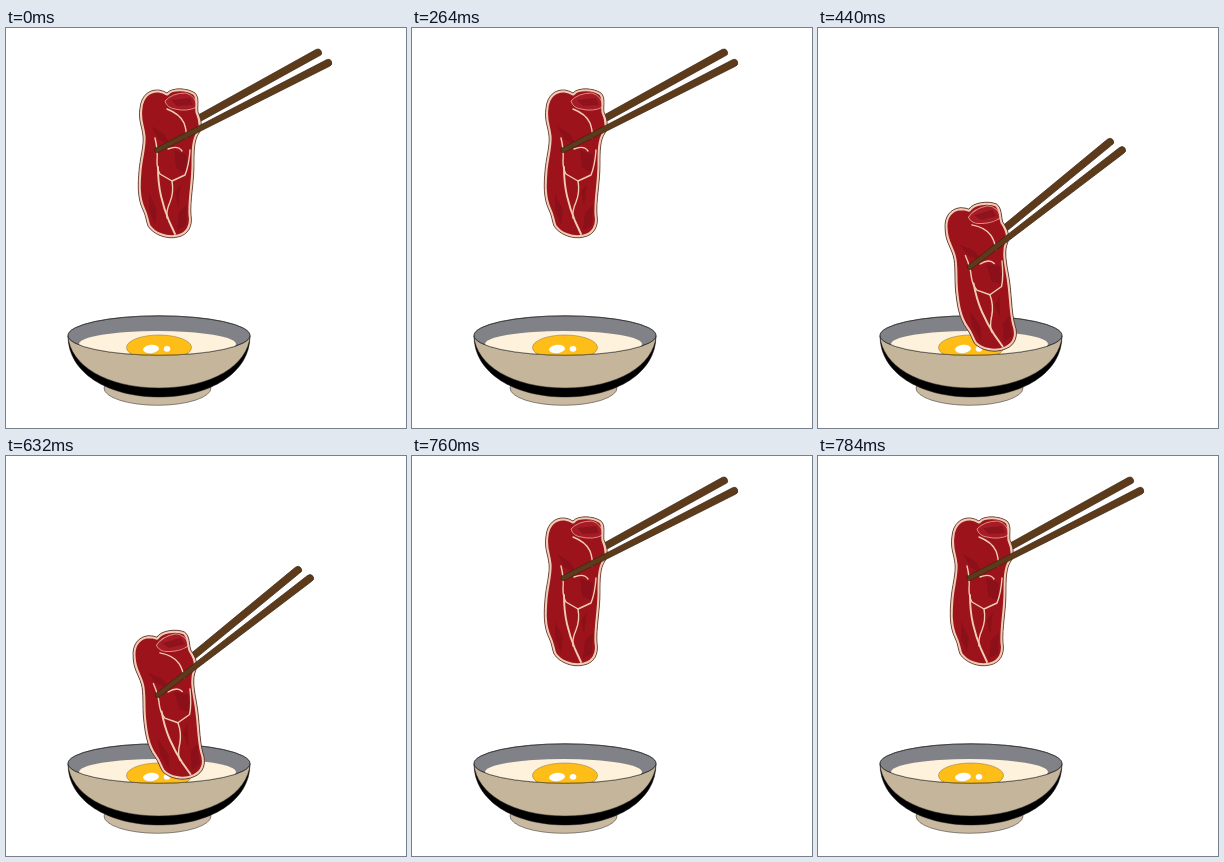
Recreate the animation shown at these times as an HTML page. Size 400x400 px, loop 0.8 s.

```html
<!DOCTYPE html>
<html lang="en">
<head>
<meta charset="utf-8">
<title>Dipping beef in egg</title>
<style>
  html, body { margin: 0; width: 100%; height: 100%; overflow: hidden; background: #fff; }
  svg { display: block; width: 100vw; height: 100vh; }
  .line { fill: none; stroke: #f0cdb4; stroke-linecap: round; stroke-linejoin: round; }
</style>
</head>
<body>
<svg viewBox="0 0 400 400">
  <defs>
    <ellipse id="rim" cx="153" cy="307.5" rx="91" ry="19.7"/>
    <clipPath id="inside"><use href="#rim"/></clipPath>
    <path id="slice" d="M134 80C135 68 143 61 153 62Q158 63 161 65C166 59 182 60 189 65C194 70 191 78 192 84C195 91 197 98 193 105C188 112 188 124 188 136C188 155 184 172 185 187C187 198 182 207 172 209C160 212 147 206 142 198C140 193 140 188 137 182C131 170 132 155 133 143C134 130 138 118 137 108C136 98 132 92 134 80Z"/>
    <clipPath id="meat"><use href="#slice"/></clipPath>
  </defs>

  <!-- bowl -->
  <g stroke="#222" stroke-width=".5">
    <ellipse cx="151.5" cy="360" rx="53.5" ry="17.3" fill="#c9b9a0"/>
    <path d="M62 308C62 345 102 369 153 369S244 345 244 308Z" fill="#000"/>
    <path d="M62 308C64 337 100 360 153 360S242 337 244 308Z" fill="#c4b59b"/>
    <use href="#rim" fill="#818287"/>
  </g>
  <g clip-path="url(#inside)">
    <ellipse cx="151.5" cy="316" rx="78.5" ry="13" fill="#fff2dc"/>
    <ellipse cx="153" cy="319.5" rx="32.5" ry="12.5" fill="#ffbd17" stroke="#8a6a30" stroke-width=".5"/>
    <ellipse cx="145" cy="321" rx="8" ry="4.2" fill="#fff" transform="rotate(-6 145 321)"/>
    <ellipse cx="161" cy="320.8" rx="3.3" ry="2.9" fill="#fff"/>
  </g>
  <use href="#rim" fill="none" stroke="#222" stroke-width=".6"/>

  <!-- beef and chopsticks -->
  <g id="bite">
    <path d="M184 91.5L310 21.5Q314 20 315.3 23.5T313 28L187 97.5Z" fill="#5d3a1a" stroke="#3a2413" stroke-width=".7"/>
    <use href="#slice" fill="#9d131c"/>
    <g clip-path="url(#meat)">
      <g fill="#8c1019">
        <path d="M145 98L158 106L166 119L152 111ZM168 122L181 127L180 145L170 140ZM169 164L175 156L172 179ZM143 165L151 182L149 197L143 182ZM173 184L181 177L180 198L171 202Z"/>
      </g>
      <path d="M159 73Q166 65 180 65Q190 68 191 79Q181 84 169 81Q161 80 159 73Z" fill="#a61b25" stroke="#d88e80" stroke-width="1"/>
      <path d="M165 72L184 70L187 77L171 78Z" fill="#8e131d"/>
      <g class="line" stroke-width="1.4">
        <path d="M161 81Q174 86 178 95Q181 103 180 110"/>
        <path d="M149 110Q152 122 151 133Q151 141 154 146L166 153L179 147Q183 137 184 122"/>
        <path d="M162 121Q172 117 176 123"/>
        <path d="M152 139Q152 155 155 168Q158 181 163 193L169 206" stroke-width="1.9"/>
        <path d="M166 153Q168 164 164 174Q160 183 161 190"/>
      </g>
      <use href="#slice" class="line" stroke-width="5"/>
    </g>
    <use href="#slice" fill="none" stroke="#45201c" stroke-width=".7"/>
    <path d="M149 120.500L320 32Q324 30 325.500 33.500T323 38.500L152 124.500Q148 125 149 120.500Z" fill="#5d3a1a" stroke="#3a2413" stroke-width=".7"/>
  </g>
</svg>
<script>
  const LOOP = 800, DIP = 440, LIFT = 760;
  const bite = document.getElementById("bite");

  function draw() {
    const t = performance.now() % LOOP;
    const dipped = t >= DIP && t < LIFT;
    bite.setAttribute("transform", dipped ? "translate(.5 117) rotate(-10.5 151 122)" : "");
    requestAnimationFrame(draw);
  }
  draw();
</script>
</body>
</html>
```
